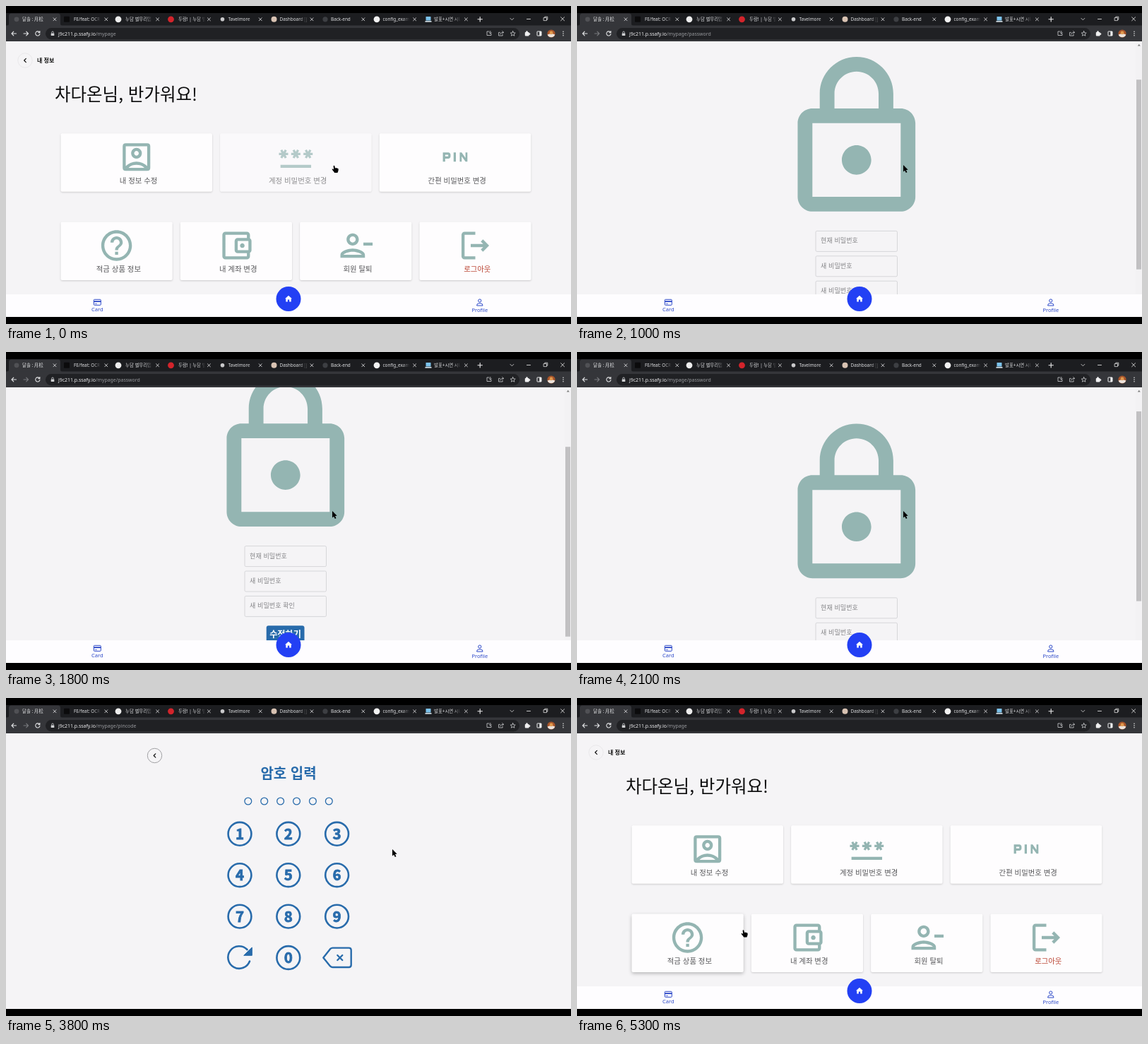
An HTML page that plays this animation: 800 px wide and 450 px high, repeating every 5400 ms.

```html
<!DOCTYPE html>
<html lang="ko">
<head>
<meta charset="utf-8">
<title>My page</title>
<style>
html, body { margin: 0; width: 100%; height: 100%; overflow: hidden; background: #000; }
svg { display: block; }
#stage { width: 100vw; height: 100vh; font-family: "Noto Sans CJK KR", "Noto Sans CJK", "Noto Sans", sans-serif; }
.ui { font-family: "Noto Sans", "Noto Sans CJK KR", "Noto Sans CJK", sans-serif; }
.line { fill: none; stroke-linecap: round; stroke-linejoin: round; }
.teal { fill: #94b5b2; }
.card > rect { fill: #fefdfe; filter: drop-shadow(0 1px 1.2px rgba(0,0,0,.17)); }
.card.hover > rect { filter: drop-shadow(0 2.5px 2.5px rgba(0,0,0,.25)); }
</style>
</head>
<body>
<svg id="stage" viewBox="0 0 800 450"></svg>
<script>
const BLUE = '#286bab', NAV = '#2c48c8', STRIP = '#1c1d20';
const ICONS = {
  lock: 'M18 8h-1V6c0-2.76-2.24-5-5-5S7 3.24 7 6v2H6c-1.1 0-2 .9-2 2v10c0 1.1.9 2 2 2h12c1.1 0 2-.9 2-2V10c0-1.1-.9-2-2-2zM9 6c0-1.66 1.34-3 3-3s3 1.34 3 3v2H9V6zm9 14H6V10h12v10zm-6-3c1.1 0 2-.9 2-2s-.9-2-2-2-2 .9-2 2 .9 2 2 2z',
  account: 'M5 3h14q2 0 2 2v14q0 2-2 2H5q-2 0-2-2V5q0-2 2-2zM5 17.85q1.35-1.32 3.14-2.09T12 15t3.86.76T19 17.85V5H5zM12 13a3.5 3.5 0 1 1 .01 0zM12 11a1.5 1.5 0 1 0-.01 0zM7 19h10v-.25q-1.05-.87-2.32-1.31T12 17t-2.68.44T7 18.75z',
  star: 'M3.15 12.95 4 11.47l.85 1.48 1.3-.75-.85-1.48H7v-1.5H5.3l.85-1.47L4.85 7 4 8.47 3.15 7l-1.3.75.85 1.47H1v1.5h1.7l-.85 1.48z',
  pin: 'M5.5 10.5v1h2v-1zM9 11.5c0 .85-.65 1.5-1.5 1.5h-2v2H4V9h3.5c.85 0 1.5.65 1.5 1.5v1zm3.5 3.5H11V9h1.5v6zm7.5 0h-1.2l-2.55-3.5V15H15V9h1.25l2.5 3.5V9H20v6z',
  help: 'M11 18h2v-2h-2v2zm1-16C6.48 2 2 6.48 2 12s4.48 10 10 10 10-4.48 10-10S17.52 2 12 2zm0 18c-4.41 0-8-3.59-8-8s3.59-8 8-8 8 3.59 8 8-3.59 8-8 8zm0-14c-2.21 0-4 1.79-4 4h2c0-1.1.9-2 2-2s2 .9 2 2c0 2-3 1.75-3 5h2c0-2.25 3-2.5 3-5 0-2.21-1.79-4-4-4z',
  wallet: 'M21 7.28V5c0-1.1-.9-2-2-2H5c-1.11 0-2 .9-2 2v14c0 1.1.89 2 2 2h14c1.1 0 2-.9 2-2v-2.28c.59-.35 1-.98 1-1.72V9c0-.74-.41-1.37-1-1.72zM20 9v6h-7V9h7zM5 19V5h14v2h-6c-1.1 0-2 .9-2 2v6c0 1.1.9 2 2 2h6v2H5zM16 10.5a1.5 1.5 0 1 0 .01 0z',
  leave: 'M14 8c0-2.21-1.79-4-4-4S6 5.79 6 8s1.79 4 4 4 4-1.79 4-4zm-2 0c0 1.1-.9 2-2 2s-2-.9-2-2 .9-2 2-2 2 .9 2 2zM2 18v2h16v-2c0-2.66-5.33-4-8-4s-8 1.34-8 4zm2 0c.2-.71 3.3-2 6-2 2.69 0 5.77 1.28 6 2H4zM17 10h6v2h-6z',
  logout: 'M17 8l-1.41 1.41L17.17 11H9v2h8.17l-1.58 1.58L17 16l4-4zM5 5h7V3H5c-1.1 0-2 .9-2 2v14c0 1.1.9 2 2 2h7v-2H5z'
};

const rect = (x, y, w, h, fill, r = 0, more = '') => `<rect x="${x}" y="${y}" width="${w}" height="${h}" rx="${r}" fill="${fill}" ${more}/>`;
const disc = (x, y, r, fill, more = '') => `<circle cx="${x}" cy="${y}" r="${r}" fill="${fill}" ${more}/>`;
const line = (d, color, width = 1) => `<path class="line" d="${d}" stroke="${color}" stroke-width="${width}"/>`;
const text = (x, cy, size, str, fill, more = '') => `<text x="${x}" y="${cy + size * .37}" font-size="${size}" fill="${fill}" ${more}>${str}</text>`;
const middle = 'text-anchor="middle"';
const icon = (d, cx, cy, scale) => `<path class="teal" fill-rule="evenodd" transform="translate(${cx - 12 * scale} ${cy - 12 * scale}) scale(${scale})" d="${d}"/>`;
const group = (id, body) => `<g id="${id}">${body}</g>`;
const backButton = (x, y, border) =>
  disc(x, y, 10.2, 'none', `stroke="${border}" stroke-width=".8"`) + line(`M${x + 1.3} ${y - 2.6}l-2.6 2.6 2.6 2.6`, '#111', 1.2);

// My page
ICONS.password = 'M2 17h20v2H2z' + ICONS.star;
const cards = [
  ['account', '내 정보 수정'], ['password', '계정 비밀번호 변경'], ['pin', '간편 비밀번호 변경'],
  ['help', '적금 상품 정보'], ['wallet', '내 계좌 변경'], ['leave', '회원 탈퇴'], ['logout', '로그아웃']
].map(([name, label], i) => {
  const top = i < 3;
  return { name, label, x: top ? 77.5 + 225.6 * i : 77.5 + 169.3 * (i - 3), y: top ? 180.3 : 305.5, w: top ? 214.5 : 158.2, h: 82.5 };
});

function cardMarkup({ name, label, x, y, w, h }) {
  const cx = x + w / 2, iy = y + 33.5, s = 2.17;
  const stars = name === 'password'
    ? [8, 16].map(dx => icon(ICONS.star, cx + dx * s, iy, s)).join('') : '';
  const color = name === 'logout' ? '#b9402f' : '#58585b';
  return `<g class="card">${rect(x, y, w, h, '#fff', 2)}${icon(ICONS[name], cx, iy, s)}${stars}${text(cx + 2.8, y + 66.5, 10.4, label, color, middle + ' font-weight="500"')}</g>`;
}

const myPage = backButton(27, 77, '#e6e5e8') +
  text(44, 76.7, 8, '내 정보', '#111', 'font-weight="700"') +
  text(69, 124.5, 24.5, '차다온님, 반가워요!', '#0c0c0d') +
  cards.map(cardMarkup).join('');

// Password page
const fields = ['현재 비밀번호', '새 비밀번호', '새 비밀번호 확인'].map((label, i) => {
  const y = 384.4 + 35.4 * i;
  return rect(338, y, 115.5, 29, 'none', 1.8, 'stroke="#cfced2" stroke-width=".8"') +
    text(345, y + 13.7, 9, label, '#858588', 'letter-spacing=".1"');
}).join('');
const passwordPage = group('scroller',
  backButton(212.5, 67, '#e0dfe3') +
  text(229, 66.3, 8, '비밀번호 변경', '#111', 'font-weight="700"') +
  icon(ICONS.lock, 395.8, 252.6, 10.417) + fields +
  rect(368.7, 497, 53.8, 25, BLUE, 3) +
  text(395.6, 509.3, 12.2, '수정하기', '#fff', middle + ' font-weight="700"')) +
  rect(791, 50, 9, 358, '#f3f2f4') +
  '<path d="M793.8 56.5l2-2.6 2 2.6z" fill="#777"/>' +
  '<rect id="thumb" x="792" width="7" height="268.5" y="59" fill="#c1c0c2"/>';

// PIN page
const keys = [1, 2, 3, 4, 5, 6, 7, 8, 9, 0].map((n, i) => {
  const x = n ? 331 + 68.8 * (i % 3) : 399.8, y = 192.3 + 58.4 * Math.floor(i / 3);
  return disc(x, y, 16.4, 'none', `stroke="${BLUE}" stroke-width="2.6"`) +
    text(x, y + .2, 20.5, n, BLUE, `${middle} font-weight="900" stroke="${BLUE}" stroke-width=".8"`);
}).join('');
const pinPage = backButton(210.5, 81.5, '#8b8b8e') +
  text(400, 107, 20, '암호 입력', BLUE, middle + ' font-weight="700"') +
  [0, 1, 2, 3, 4, 5].map(i => disc(342.8 + 22.9 * i, 146, 4.9, 'none', `stroke="${BLUE}" stroke-width="1.3"`)).join('') +
  keys +
  line('M341.5 356A15.8 15.8 0 1 0 345 372.5', BLUE, 2.6) +
  `<path d="M348.3 353v11.3h-11.6z" fill="${BLUE}" stroke="${BLUE}" stroke-linejoin="round"/>` +
  line('M449.3 367.5L459 355.2Q460.6 353.6 462.5 353.6H485.5Q488.7 353.6 488.7 356.8V377.8Q488.7 381 485.5 381H462.5Q460.6 381 459 379.4Z', BLUE, 2.4) +
  line('M469.3 364l7 7m0-7l-7 7', BLUE, 2.3);

const bottomNav = rect(0, 408, 800, 32, '#fefdff') +
  rect(124.3, 415.3, 10, 8, 'none', 1, `stroke="${NAV}"`) + rect(124.3, 417.2, 10, 1.8, NAV) +
  line('M126 421.3h2.5', NAV, .8) +
  disc(670.8, 417, 2.1, 'none', `stroke="${NAV}"`) +
  line('M666.6 423.6q0-2.8 2.8-2.8h2.8q2.8 0 2.8 2.8z', NAV) +
  `<g class="ui" font-weight="500">${text(129.3, 429.3, 7.5, 'Card', NAV, middle)}${text(670.8, 430, 7.5, 'Profile', NAV, middle)}</g>` +
  disc(400, 414.5, 17.5, '#2340f4') +
  '<path d="M400 409.7l5 4.5h-1.3v4.3h-2.5v-3h-2.4v3h-2.5v-4.3H395z" fill="#fff"/>';

// Browser window
const tabs = [
  [15, '#505155', 3.4, '달솔 : 月松', 23], [86, '#0b0b0c', 0, 'FE/feat: OCR 인', 96],
  [159, '#eeeeee', 4.4, '누담 별무리탭', 169], [233.5, '#d3242b', 4.4, '두랑! | 누담 별', 244],
  [306.5, '#c9c9cb', 2.8, 'Tavelmore', 314.5], [379.5, '#d8c2b2', 4, 'Dashboard [Jen', 387.5],
  [452, '#3d3f43', 3.6, 'Back-end', 460], [525, '#f2f2f2', 4.4, 'config_example', 533.5],
  [598, '', 0, '발표+시연 시나', 606]
].map(([x, color, r, title, tx], i) => {
  let mark = r ? disc(x, 18.8, r, color) : rect(x - 4, 14.8, 8, 8, color, 1);
  if (!color) mark = rect(x - 3.5, 15, 7, 5.6, '#7cc3ec', .6) + rect(x - 4.6, 21, 9.2, 1.8, '#c9d5dc', .6);
  const fade = i ? rect(28, 0, 10, 14, 'url(#fade)') : '';
  const end = 69 + 72.8 * i;
  return mark + `<svg x="${tx}" y="12" width="38" height="14">${text(0, 6.4, 6.4, title, '#dfe0e2')}${fade}</svg>` +
    line(`M${end - 2} 16.8l4 4m0-4l-4 4`, '#d5d5d7', .9);
}).join('');

const TOOL = '#cfd0d2';
const chrome = `<defs><linearGradient id="fade"><stop stop-color="${STRIP}" stop-opacity="0"/><stop offset="1" stop-color="${STRIP}"/></linearGradient></defs>` +
  rect(0, 0, 800, 10, '#000') + rect(0, 10, 800, 18, STRIP) +
  '<path d="M1 28q3 0 3-3V14q0-3.5 3.5-3.5h66q3.5 0 3.5 3.5V25q0 3 3 3z" fill="#35363a"/>' +
  rect(0, 27.5, 800, 22.5, '#35363a') + rect(56, 31, 671, 16.4, '#202124', 8.2) +
  `<g class="ui">${tabs}` +
  `<text x="74" y="41.6" font-size="6.93" fill="#eeeef0">j9c211.p.ssafy.io<tspan id="path" fill="#97999d"></tspan></text></g>` +
  line('M668 18.8h6.4m-3.2-3.2v6.4', '#eee', 1.1) +
  line('M714 17.4l2.4 2.4 2.4-2.4', '#ccc', .9) + line('M737.5 18.5h5', '#ddd', .9) +
  line('M761.5 16.6h4v4h-4zM762.8 16.4v-1.2h4v4h-1.1', '#ddd', .8) +
  line('M785.6 15.8l5 5m0-5l-5 5', '#ddd', .9) +
  line('M14.5 39h-6.5m2.8-2.8L8 39l2.8 2.8', '#e4e5e7', 1.1) +
  group('forward', line('M25 39h6.5m-2.8-2.8l2.8 2.8-2.8 2.8', 'currentColor', 1.1)) +
  line('M47.3 37a3.1 3.1 0 1 0 .6 2.6M47.9 35.5v2.2h-2.2', '#e4e5e7', 1.1) +
  rect(63.7, 38.4, 4.6, 3.6, TOOL, .5) + line('M64.7 38.3v-1a1.3 1.3 0 0 1 2.6 0v1', TOOL, .8) +
  line('M684 36h-3v5.5h6v-2M685.8 35.5v3.5m-1.5-1.4l1.5 1.5 1.5-1.5', TOOL, .8) +
  line('M699.4 37.4h-1.8v4.6h5.5v-1.5M699.8 40q.3-2.7 4.5-2.7m-1.6-1.7l1.8 1.7-1.8 1.7', TOOL, .8) +
  line('M717.7 35.6l1 2.3 2.5.2-1.9 1.7.6 2.4-2.2-1.3-2.2 1.3.6-2.4-1.9-1.7 2.5-.2z', TOOL, .8) +
  rect(734.8, 37, 5.8, 5.4, '#f0f0f1', .8) + disc(737.5, 36.6, 1.3, '#f0f0f1') + disc(741, 39.6, 1.3, '#f0f0f1') +
  rect(752, 36, 6, 6, 'none', .5, 'stroke="#f0f0f1"') + rect(755.3, 36, 2.7, 6, '#f0f0f1') +
  disc(772, 39, 5.6, '#a8552a') + '<path d="M766.7 40.5a5.6 5.6 0 0 0 10.6 0q-5-3-10.6 0z" fill="#ece3dc"/>' +
  disc(772, 37.8, 2.4, '#e09a4e') +
  [36.2, 39, 41.8].map(y => disc(789, y, .8, '#e4e5e7')).join('') +
  rect(0, 440, 800, 10, '#000');

const pointer = group('pointer',
  '<path id="arrow" d="M0 0v9.6l2.2-1.9 1.6 3.4 1.7-.8-1.6-3.3 2.8-.3z"/>' +
  '<path id="hand" d="M1.6 1.2q1.3-.9 1.8.6l.6 2.6 1.3-.3 1.2.4 1.2.2q1.1.4 1 1.7l-.3 2.2-1 2.4H3.2L1 8Q-.8 6.2-.3 5.6q.8-.7 2.4.8z"/>');

const $ = id => document.getElementById(id);
$('stage').innerHTML = rect(0, 50, 800, 390, '#f5f4f6') + group('my', myPage) + group('password', passwordPage) +
  group('pincode', pinPage) + group('nav', bottomNav) + chrome + pointer;
const cardNodes = [...document.querySelectorAll('.card')];

// Timeline: [ms, value...]
const LOOP = 5400, STEP = 100;
const scrollKeys = [[0, 0], [800, 0], [900, 28], [1000, 66], [1100, 94], [1200, 109.8], [1900, 109.8], [2200, 0]];
const pointerKeys = [[0, 462, 225], [2100, 462, 225], [2400, 207, 62], [2600, 207, 57], [2700, 207, 57],
  [3300, 547, 214], [4000, 547, 214], [4500, 207, 79], [4700, 207, 79], [5300, 233, 327.5]];
const backAreas = { my: [27, 77], password: [212.5, 67], pincode: [210.5, 81.5] };

function sample(keys, t, ease = k => k) {
  const i = keys.findIndex(key => key[0] > t);
  if (i < 0) return keys[keys.length - 1].slice(1);
  const [a, b] = [keys[i - 1], keys[i]], k = ease((t - a[0]) / (b[0] - a[0]));
  return a.slice(1).map((v, j) => v + (b[j + 1] - v) * k);
}
const smooth = k => k * k * (3 - 2 * k);
const pageAt = t => t < 100 ? 'my' : t < 2500 ? 'password' : t < 3500 ? 'my' : t < 4700 ? 'pincode' : 'my';
const show = (id, on) => $(id).style.display = on ? '' : 'none';

function render(t) {
  const page = pageAt(t), [scroll] = sample(scrollKeys, t), [x, y] = sample(pointerKeys, t, smooth);
  for (const id of ['my', 'password', 'pincode']) show(id, id === page);
  show('nav', page !== 'pincode');
  $('path').textContent = '/mypage' + (page === 'my' ? '' : '/' + page);
  $('forward').style.color = page === 'my' ? '#e4e5e7' : '#77787c';
  $('scroller').setAttribute('transform', `translate(0 ${-scroll})`);
  $('thumb').setAttribute('y', 59 + scroll * .685);

  const pressed = t < 100 ? 1 : t >= 3400 && t < 3500 ? 2 : -1;
  let over = false;
  cards.forEach((c, i) => {
    const inside = page === 'my' && x > c.x && x < c.x + c.w && y > c.y && y < c.y + c.h;
    over = over || inside;
    cardNodes[i].classList.toggle('hover', inside && i !== pressed);
    cardNodes[i].style.opacity = i === pressed ? .66 : 1;
  });
  const [bx, by] = backAreas[page];
  over = over || Math.hypot(x - bx, y - by - (page === 'password' ? -scroll : 0)) < 10;
  show('hand', over);
  show('arrow', !over);
  $('pointer').setAttribute('transform', `translate(${x} ${y})`);
}

const start = performance.now();
function tick() {
  const t = (performance.now() - start) % LOOP;
  render(Math.floor(t / STEP) * STEP);
  requestAnimationFrame(tick);
}
tick();
</script>
</body>
</html>
```
